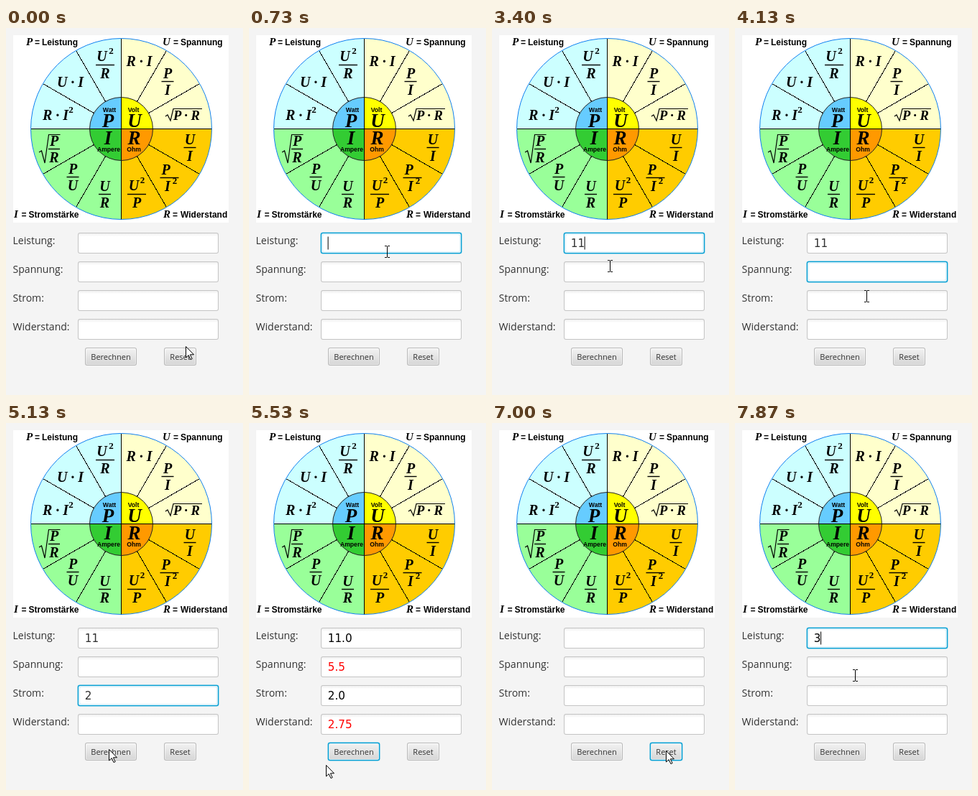
These frames come from a looping animation (330x511 px, 8 s). An HTML page:

```html
<!DOCTYPE html>
<html lang="de">
<head>
<meta charset="utf-8">
<title>Leistungsrechner</title>
<style>
html, body { margin: 0; width: 100%; height: 100%; overflow: hidden; background: #f4f4f4; }
svg { display: block; width: 330px; height: 511px; }
.math { font: italic bold 20px "Liberation Serif", serif; }
.power { font: bold 13px "Liberation Serif", serif; }
.name { font: bold 12px "Liberation Sans", sans-serif; }
.unit { font: bold 8.6px "Liberation Sans", sans-serif; }
.label { font: 14px "Open Sans", sans-serif; fill: #333; }
.value { font: 15.2px "DejaVu Sans", sans-serif; }
.btn { font: 11px "Open Sans", sans-serif; fill: #333; }
.crisp { shape-rendering: crispEdges; }
</style>
</head>
<body>
<svg id="stage" viewBox="0 0 330 511">
  <defs>
    <linearGradient id="up" x2="0" y2="1"><stop stop-color="#f1f1f1"/><stop offset="1" stop-color="#d7d7d7"/></linearGradient>
    <linearGradient id="down" x2="0" y2="1"><stop stop-color="#dedede"/><stop offset="1" stop-color="#c6c6c6"/></linearGradient>
    <linearGradient id="edge" x2="0" y2="1"><stop stop-color="#fdfdfd"/><stop offset="1" stop-color="#e6e6e6"/></linearGradient>
    <linearGradient id="well" x2="0" y2="1"><stop stop-color="#f0f0f0"/><stop offset=".16" stop-color="#fff"/></linearGradient>
  </defs>
</svg>
<script>
const stage = document.getElementById('stage');

function add(tag, attrs, text) {
  const node = document.createElementNS('http://www.w3.org/2000/svg', tag);
  set(node, attrs);
  if (text !== undefined) node.textContent = text;
  return stage.appendChild(node);
}
function set(node, attrs) {
  for (const key in attrs) node.setAttribute(key, attrs[key]);
}
function write(cls, x, y, text, anchor = 'start', size) {
  const node = add('text', { class: cls, x, y, 'text-anchor': anchor }, text);
  if (size) node.style.fontSize = size + 'px';
  return node;
}
const math = (x, y, text, size) => write('math', x, y, text, 'middle', size);
const square = (x, y) => write('power', x, y, '2', 'middle');
const stroke = (d, width = 1, cls = '') =>
  add('path', { d, fill: 'none', stroke: '#000', 'stroke-width': width, class: cls });
const box = (x, y, width, height, rx, fill) =>
  add('rect', { x, y, width, height, rx, fill });

// Formula wheel
const CX = 160.5, CY = 140.5, OUTER = 126, INNER = 44;

function quarters(radius, colors) {
  colors.forEach((fill, i) => {
    const a = i * Math.PI / 2, b = a + Math.PI / 2;
    const at = q => `${CX + radius * Math.cos(q)} ${CY + radius * Math.sin(q)}`;
    add('path', { d: `M${CX} ${CY}L${at(a)}A${radius} ${radius} 0 0 1 ${at(b)}Z`, fill });
  });
}
function ring(r, color) {
  add('circle', { cx: CX, cy: CY, r, fill: 'none', stroke: color });
}
function fraction(x, y, top, bottom, half = 8.5) {
  math(x, y - 4.5, top);
  math(x, y + 19, bottom);
  stroke(`M${x - half} ${y + .5}h${2 * half}`, 1.4);
}

box(10, 10, 300, 261, 0, '#fff');
quarters(OUTER, ['#fc0', '#9f9', '#cff', '#ffc']);
quarters(INNER, ['#f90', '#3c3', '#6cf', '#ff0']);
for (let i = 0; i < 12; i++) {
  const a = i * Math.PI / 6, c = Math.cos(a), s = Math.sin(a);
  const from = i % 3 ? INNER : 0;
  stroke(`M${CX + from * c} ${CY + from * s}L${CX + OUTER * c} ${CY + OUTER * s}`, 1, 'crisp');
}
ring(OUTER, '#1080f0');
ring(INNER, '#222');

[[28, 24, 'P', 40, 50, 'Leistung'], [218, 24, 'U', 233, 243, 'Spannung'],
 [11, 264, 'I', 21.5, 31.5, 'Stromstärke'], [219, 264, 'R', 232, 243, 'Widerstand']]
  .forEach(([x, y, sign, eq, wx, word]) => {
    write('math', x, y, sign, 'start', 15);
    write('name', eq, y, '=');
    write('name', wx, y, word);
  });

fraction(138, 51, '', 'R', 13);
math(133.5, 46, 'U');
square(146.5, 36);
math(89.5, 82, 'U · I');
math(69, 128, 'R · I');
square(90.5, 118);
math(185.5, 53, 'R · I');
fraction(225, 74, 'P', 'I');
math(251.5, 128, 'P · R', 18.5);
stroke('M222 123l3 -2l4 8l4 -16.5h40', 1.2);
fraction(256, 166, 'U', 'I');
fraction(227.5, 208, '', '', 13);
math(222.5, 204, 'P');
math(225, 227, 'I');
square(235, 217);
fraction(182, 231, '', 'P', 13);
math(178, 226, 'U');
square(190, 216);
fraction(137.5, 231, 'U', 'R');
fraction(93, 207, 'P', 'U');
fraction(67, 168, 'P', 'R', 8);
stroke('M46 173l3.5 -2l4.5 17l5.5 -39.5h16', 1.2);

math(142, 138, 'P', 27);
math(179, 138, 'U', 27);
math(142, 162, 'I', 27);
math(178.5, 162, 'R', 27);
[[144, 117, 'Watt'], [177.5, 117, 'Volt'], [143, 172, 'Ampere'], [178, 172, 'Ohm']]
  .forEach(([x, y, text]) => write('unit', x, y, text, 'middle'));

// Form: every control has a rim that swells and turns blue with the focus
function frame(x, y, w, h, color) {
  const glow = box(x - 1, y - 1, w + 2, h + 2, 4, '#039ed3');
  const rim = box(x, y, w, h, 3, color);
  return on => {
    const grow = on ? .25 : 0;
    set(glow, { opacity: on ? .18 : 0 });
    set(rim, {
      x: x - grow, y: y - grow, width: w + 2 * grow, height: h + 2 * grow,
      fill: on ? '#039ed3' : color
    });
  };
}

const fields = ['Leistung:', 'Spannung:', 'Strom:', 'Widerstand:'].map((title, i) => {
  const y = 285 + 40 * i;
  write('label', 9.6, y + 16, title);
  return {
    y,
    focus: frame(100, y, 196, 29, '#c4c4c4'),
    halo: box(101, y + 1, 194, 27, 2, '#dcf1f9'),
    well: box(101, y + 1, 194, 27, 2, 'url(#well)'),
    text: write('value', 109.8, y + 20, '')
  };
});
const buttons = [[110, 72, 'Berechnen'], [220, 45, 'Reset']].map(([x, w, title]) => {
  const b = {
    focus: frame(x, 445, w, 25, '#b8b8b8'),
    edge: box(x + 1, 446, w - 2, 23, 2, 'url(#edge)'),
    body: box(x + 2, 447, w - 4, 21, 1.5, 'url(#up)')
  };
  write('btn', x + w / 2, 462, title, 'middle');
  return b;
});
const caret = box(0, 0, 1, 18, 0, '#000');
const arrow = add('path', {
  d: 'M.5 .5V16L4.2 12.6L7 18.6L9.2 17.6L6.4 11.8H11.5Z', fill: '#fff', stroke: '#000'
});
const beam = stroke('M-3 -7.5H0M1 -7.5H4M-3 8.5H0M1 8.5H4M.5 -7V8', 1, 'crisp');

// Timeline in ticks of 1/15 s
const TICK = 1000 / 15, LOOP = 8000;
const path = [
  [0, 250, 443], [6, 222, 372], [10, 194, 315], [11, 192, 311], [13, 192, 311], [14, 198, 312],
  [24, 198, 312], [29, 167, 332], [32, 170, 343], [39, 170, 343], [44, 168, 352], [51, 164, 331],
  [53, 164, 331], [58, 179, 405], [60, 179, 405], [62, 183, 373], [66, 183, 373], [70, 166, 420],
  [73, 150, 479], [76, 143, 454], [81, 143, 454], [85, 70, 498], [88, 6, 485], [90, 6, 485],
  [93, 88, 472], [95, 184, 474], [97, 184, 474], [101, 242, 456], [105, 242, 456],
  [110, 185, 305], [111, 185, 305], [114, 167, 351]
];
const focusAt = [[0, -1], [10, 0], [52, 1], [64, 2], [79, 4], [103, 5], [111, 0]];
const valuesAt = [
  [0, []], [28, ['1']], [30, ['11']], [70, ['11', '', '2']],
  [80, ['11.0', '5.5', '2.0', '2.75']], [104, []], [118, ['3']]
];
const inkAt = [[0, '#323232'], [80, '#000']];
const caretOn = [[11, 18], [25, 37], [45, 52], [54, 62], [66, 77], [112, 120]];
const pressed = [[79, 0], [103, 1]];

const latest = (list, k) => list.filter(item => item[0] <= k).pop()[1];

function pointer(k) {
  const i = path.findIndex(p => p[0] > k);
  if (i < 0) return path[path.length - 1].slice(1);
  const a = path[i - 1], b = path[i], u = (k - a[0]) / (b[0] - a[0]);
  return [1, 2].map(n => Math.round(a[n] + (b[n] - a[n]) * u));
}

function draw(ms) {
  const k = Math.floor((ms % LOOP + 5) / TICK);
  const focus = latest(focusAt, k), values = latest(valuesAt, k), ink = latest(inkAt, k);
  const [x, y] = pointer(k);
  const solved = values.length === 4;

  fields.forEach((f, i) => {
    const on = focus === i;
    f.focus(on);
    set(f.halo, { opacity: on ? 1 : 0 });
    set(f.well, on ? { x: 103, y: f.y + 3, width: 190, height: 23, fill: '#fff' }
                   : { x: 101, y: f.y + 1, width: 194, height: 27, fill: 'url(#well)' });
    f.text.textContent = values[i] || '';
    set(f.text, { fill: solved && i % 2 ? '#f00' : ink });
  });

  buttons.forEach((b, i) => {
    const on = focus === i + 4;
    const held = pressed.some(([t, n]) => t === k && n === i);
    b.focus(on);
    set(b.edge, { fill: on ? '#d3ebf4' : 'url(#edge)' });
    set(b.body, { fill: `url(#${held ? 'down' : 'up'})` });
  });

  const blink = focus >= 0 && focus < 4 && caretOn.some(([a, b]) => k >= a && k < b);
  set(caret, { opacity: blink ? 1 : 0 });
  if (blink) set(caret, { x: 109.6 + 9.5 * (values[focus] || '').length, y: fields[focus].y + 5.5 });

  const inField = x >= 100 && x < 296 && fields.some(f => y >= f.y && y < f.y + 29);
  set(arrow, { transform: `translate(${x} ${y})`, opacity: inField ? 0 : 1 });
  set(beam, { transform: `translate(${x} ${y})`, opacity: inField ? 1 : 0 });
}

const start = performance.now();
function loop() {
  draw(performance.now() - start);
  requestAnimationFrame(loop);
}
draw(0);
requestAnimationFrame(loop);
</script>
</body>
</html>
```
